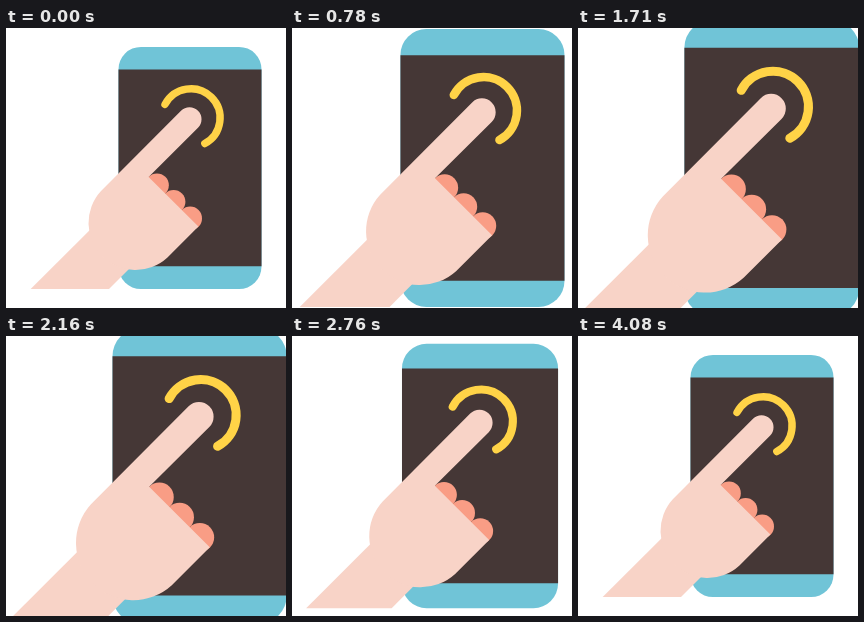
Write an HTML page that moves like this. It is 280 by 280 pixels and loops after 4110 ms.

```html
<!DOCTYPE html>
<html lang="en">
<head>
<meta charset="utf-8">
<title>Tap</title>
<style>
  html, body { margin: 0; height: 100%; overflow: hidden; background: #fff; }
  svg { display: block; width: 100%; height: 100%; }
</style>
</head>
<body>
<svg viewBox="0 0 280 280">
  <g id="icon">
    <rect x="112.5" y="18.9" width="143" height="242.2" rx="22.5" fill="#70c4d7"/>
    <path d="M112.5 41.6h143v196.6h-143z" fill="#453736"/>
    <path d="M159 76.4A29.2 29.2 0 1 1 198.8 115.6" fill="none" stroke="#ffd347" stroke-width="7.4" stroke-linecap="round"/>
    <g fill="#f99d85">
      <circle cx="151" cy="157.2" r="11.8"/>
      <circle cx="167.6" cy="173.8" r="11.8"/>
      <circle cx="184.2" cy="190.4" r="11.8"/>
    </g>
    <g fill="#f8d3c7">
      <path d="M110 176L24.7 261.1H103L150 214z"/>
      <path d="M142.6 148.9L192.4 198.6L161.2 229.7A47 47 0 0 1 94.8 163.3L175 82.8A12 12 0 0 1 192 99.8z"/>
    </g>
  </g>
</svg>
<script>
const LOOP = 4110, HALF = LOOP / 2, GROWTH = 0.225;
const icon = document.getElementById('icon');

const bezier = (a, b, u) => 3 * a * u * (1 - u) ** 2 + 3 * b * u * u * (1 - u) + u ** 3;

// cubic-bezier(.25, .1, .25, 1), solved by bisection
function ease(x) {
  let lo = 0, hi = 1;
  for (let i = 0; i < 24; i++) {
    const mid = (lo + hi) / 2;
    if (bezier(0.25, 0.25, mid) < x) lo = mid; else hi = mid;
  }
  return bezier(0.1, 1, lo);
}

function draw(now) {
  const t = now % LOOP;
  const grow = t < HALF ? ease(t / HALF) : 1 - ease(t / HALF - 1);
  icon.setAttribute('transform', `translate(140 140) scale(${1 + GROWTH * grow}) translate(-140 -140)`);
}

const start = performance.now();
function tick() {
  draw(performance.now() - start);
  requestAnimationFrame(tick);
}
tick();
</script>
</body>
</html>
```
